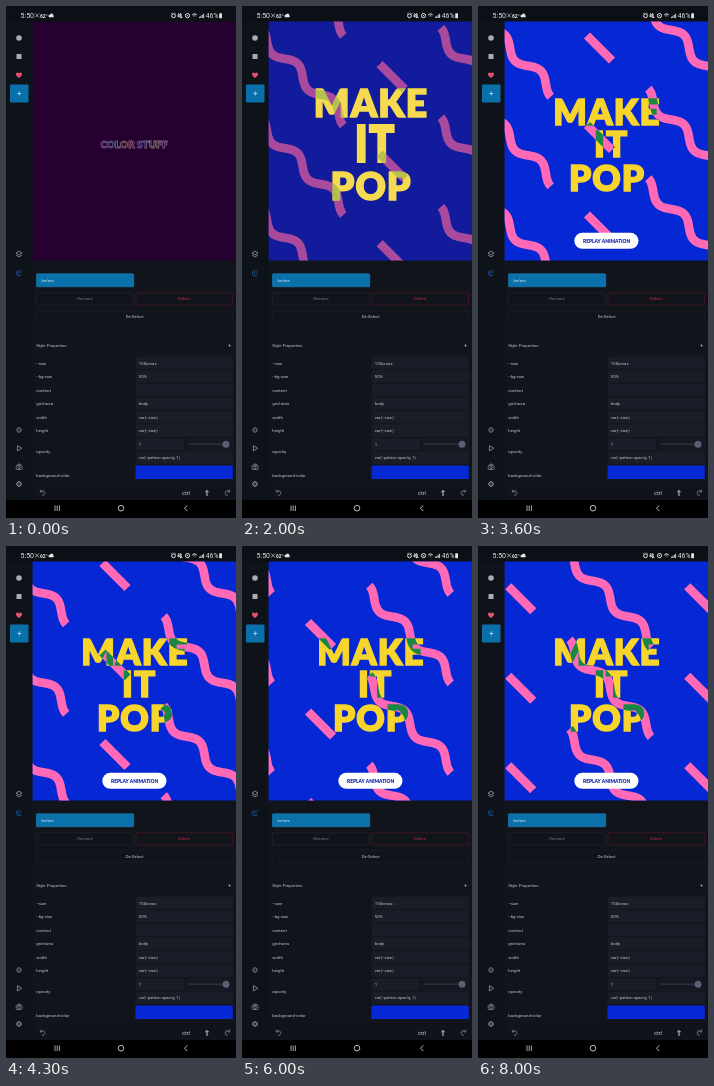
An HTML page with a canvas for the animation above (8100 ms loop, 230 by 512 pixels).

```html
<!DOCTYPE html>
<html lang="en">
<head>
<meta charset="utf-8">
<title>Make it pop</title>
<style>
  html, body { margin: 0; width: 100%; height: 100%; overflow: hidden; background: #000; }
  canvas { display: block; width: 230px; height: 512px; }
</style>
</head>
<body>
<canvas id="stage"></canvas>
<script>
const W = 230, H = 512, LOOP = 8100, STEP = 100;
const VIEW = { x: 26.6, y: 15.5, w: 203.4, h: 239 };
const TILE = 179, HALF = TILE / 2;
const UI = 'Roboto, sans-serif', DISPLAY = 'Lato, sans-serif';
const dpr = Math.max(1, window.devicePixelRatio || 1);

function makeLayer(canvas) {
  canvas.width = W * dpr;
  canvas.height = H * dpr;
  const c = canvas.getContext('2d');
  c.scale(dpr, dpr);
  return c;
}
const ctx = makeLayer(document.getElementById('stage'));
const words = makeLayer(document.createElement('canvas'));
const panel = makeLayer(document.createElement('canvas'));

// Smooth interpolation through [time, value] pairs.
function track(t, ...keys) {
  if (t <= keys[0][0]) return keys[0][1];
  for (let i = 1; i < keys.length; i++) {
    const [a, from] = keys[i - 1], [b, to] = keys[i];
    if (t <= b) {
      const u = (t - a) / (b - a);
      return from + (to - from) * u * u * (3 - 2 * u);
    }
  }
  return keys[keys.length - 1][1];
}

const mix = (a, b, u) => `rgb(${a.map((v, i) => Math.round(v + (b[i] - v) * u))})`;

function box(c, x, y, w, h, fill, stroke, r = 0) {
  c.beginPath();
  c.roundRect(x, y, w, h, r);
  if (fill) { c.fillStyle = fill; c.fill(); }
  if (stroke) { c.strokeStyle = stroke; c.lineWidth = 0.6; c.stroke(); }
}

function label(c, str, x, y, size, color, align = 'left', weight = 400, family = UI) {
  c.font = `${weight} ${size}px ${family}`;
  c.textAlign = align;
  c.textBaseline = 'alphabetic';
  c.fillStyle = color;
  c.fillText(str, x, y);
}

function line(c, points, color, width = 0.8, close = false) {
  c.beginPath();
  points.forEach(([x, y], i) => i ? c.lineTo(x, y) : c.moveTo(x, y));
  if (close) c.closePath();
  c.strokeStyle = color;
  c.lineWidth = width;
  c.stroke();
}

function disc(c, x, y, r, fill, stroke, width = 0.8) {
  c.beginPath();
  c.arc(x, y, r, 0, Math.PI * 2);
  if (fill) { c.fillStyle = fill; c.fill(); }
  if (stroke) { c.strokeStyle = stroke; c.lineWidth = width; c.stroke(); }
}

function arc(c, x, y, r, from, to, color, width = 0.8) {
  c.beginPath();
  c.arc(x, y, r, from, to);
  c.strokeStyle = color;
  c.lineWidth = width;
  c.stroke();
}

function gear(c, x, y, color) {
  for (let i = 0; i < 8; i++) {
    const a = i * Math.PI / 4, dx = Math.cos(a), dy = Math.sin(a);
    line(c, [[x + dx * 2, y + dy * 2], [x + dx * 3, y + dy * 3]], color, 0.9);
  }
  disc(c, x, y, 2, null, color, 0.7);
  disc(c, x, y, 0.6, color);
}

function statusBar(c) {
  const white = '#e4e4e4';
  label(c, '5:50', 14.5, 12, 7, white);
  line(c, [[29, 7.5], [33, 11.5]], white, 0.7);
  line(c, [[33, 7.5], [29, 11.5]], white, 0.7);
  label(c, '62°', 34, 11.6, 5, white, 'left', 700);
  disc(c, 43.7, 10, 1.2, white);
  disc(c, 45.6, 9.3, 1.7, white);
  box(c, 43, 9.8, 4.8, 1.5, white, null, 0.7);
  disc(c, 167.5, 9.8, 1.9, null, white, 1);
  line(c, [[165.3, 7.8], [166.4, 7]], white);
  line(c, [[168.6, 7], [169.7, 7.8]], white);
  line(c, [[172, 9], [173.4, 9], [175, 7.5], [175, 12], [173.4, 10.7], [172, 10.7]], white, 1, true);
  line(c, [[172, 7], [176.5, 12]], white);
  disc(c, 181.5, 9.6, 2.1, null, white, 1);
  disc(c, 181.5, 9.6, 0.7, white);
  arc(c, 188.5, 10.8, 2.9, Math.PI * 1.2, Math.PI * 1.8, white, 1);
  arc(c, 188.5, 11, 1.3, Math.PI * 1.2, Math.PI * 1.8, white);
  for (let i = 0; i < 4; i++) box(c, 193 + i * 1.4, 10.7 - i, 0.9, 1.2 + i, white);
  label(c, '46%', 199.8, 12, 6.8, white);
  box(c, 213.2, 7.2, 2.8, 5, white, null, 0.6);
}

function sidebar(c) {
  const grey = '#a9adb4';
  disc(c, 13, 32, 2.8, grey);
  box(c, 10.5, 48, 5, 5, grey);
  c.fillStyle = '#e2506c';
  c.beginPath();
  c.moveTo(13, 72);
  c.bezierCurveTo(7.5, 68.5, 10.8, 64.6, 13, 67.3);
  c.bezierCurveTo(15.2, 64.6, 18.5, 68.5, 13, 72);
  c.fill();
  box(c, 4, 78.5, 18.5, 18, '#0a70aa', null, 1);
  line(c, [[13.3, 85.5], [13.3, 89.5]], '#d7e8f2', 0.7);
  line(c, [[11.3, 87.5], [15.3, 87.5]], '#d7e8f2', 0.7);
  line(c, [[13, 245], [16, 247], [13, 249], [10, 247]], grey, 0.7, true);
  line(c, [[10, 249], [13, 251], [16, 249]], grey, 0.7);
  const blue = '#245fa8';
  arc(c, 13, 267, 2.7, 0.5, 4.6, blue, 0.9);
  arc(c, 13.6, 267, 1.2, 2, 6, blue, 0.8);
  line(c, [[14.5, 265], [16, 264]], blue);
  gear(c, 13, 424, '#858991');
  line(c, [[11.4, 439.7], [15.7, 442.3], [11.4, 444.9]], grey, 0.7, true);
  box(c, 10.2, 459.3, 5.8, 4.2, null, grey, 0.7);
  line(c, [[11.8, 459], [12.3, 458], [14, 458], [14.5, 459]], grey, 0.6);
  disc(c, 13.1, 461.4, 1.2, null, grey, 0.6);
  gear(c, 13, 478, grey);
}

function properties(c) {
  const text = '#c6c9ce', field = '#191d28', edge = '#1c202b', size = 4.3;
  box(c, 30.5, 267.8, 97.2, 13, '#0b71ab', '#1d83ba', 0.8);
  label(c, 'before', 35.5, 275.7, size, '#d5e6f0');
  box(c, 30.5, 286.8, 97, 12.2, null, '#242830', 0.6);
  label(c, 'Rename', 79, 294.3, size, '#727780', 'center');
  box(c, 130, 286.8, 96.5, 12.2, null, '#591825', 0.6);
  label(c, 'Delete', 178, 294.3, size, '#c32940', 'center');
  box(c, 30.5, 304.8, 196, 12, null, '#1d2028', 0.6);
  label(c, 'De-Select', 128.7, 312, size, text, 'center');
  line(c, [[30, 327], [227, 327]], '#161921', 0.6);

  label(c, 'Style Properties', 30.3, 341, size, text);
  label(c, '+', 223.5, 341.2, 5.5, text, 'center');
  const rows = [
    ['--size', '150cmax'], ['--bg-size', '50%'], ['content', ''],
    ['grid-area', 'body'], ['width', 'var(--size)'], ['height', 'var(--size)']
  ];
  rows.forEach(([name, value], i) => {
    const y = 357 + i * 13.55;
    label(c, name, 30.3, y + 1.5, size, text);
    box(c, 130, y - 6, 96.5, 11.8, field, edge, 0.5);
    label(c, value, 132.8, y + 1.5, size, text);
  });
  label(c, 'opacity', 30.3, 446.5, size, text);
  box(c, 130, 432.4, 47.5, 11.8, field, edge, 0.5);
  label(c, '1', 132.8, 439.9, size, text);
  box(c, 180, 432.4, 46.5, 11.8, '#151820', edge, 0.5);
  box(c, 182, 437.2, 40, 1.8, '#292d37', null, 0.9);
  disc(c, 220, 438.2, 3.5, '#596075');
  box(c, 130, 446, 96.5, 11.8, field, edge, 0.5);
  label(c, 'var(--pattern-opacity, 1)', 132.8, 453.4, 4, text);
  label(c, 'background-color', 30.3, 471.4, size, text);
  box(c, 129.5, 459.6, 97.3, 13.3, '#0729d5');
}

function toolbars(c) {
  const grey = '#9296a0', white = '#d0d0d0';
  box(c, 27, 476, 203, 18, '#10131a');
  arc(c, 36.5, 487, 2.3, -2.5, 1.8, grey, 0.7);
  line(c, [[34.2, 483.7], [34.5, 486], [36.7, 485.8]], grey, 0.7);
  label(c, 'ctrl', 180, 488.6, 5.5, white, 'center');
  line(c, [[201, 490], [201, 484.6]], white, 1);
  line(c, [[199.2, 486.2], [201, 484.4], [202.8, 486.2]], white, 0.9);
  arc(c, 221.5, 487, 2.3, 1.4, 5.7, grey, 0.7);
  line(c, [[223.8, 483.7], [223.5, 486], [221.3, 485.8]], grey, 0.7);

  box(c, 0, 494, W, 18, '#000');
  for (const x of [49, 51.2, 53.4]) line(c, [[x, 499.5], [x, 505]], white, 0.8);
  disc(c, 115, 502.2, 2.8, null, white, 0.9);
  line(c, [[181.3, 499.4], [178.5, 502.2], [181.3, 505]], white, 0.9);
}

function paintPanel() {
  box(panel, 0, 0, W, 16, '#0c1016');
  box(panel, 0, 16, W, 478, '#11141b');
  box(panel, 0, 16, 27, 478, '#0e1219');
  statusBar(panel);
  sidebar(panel);
  properties(panel);
  toolbars(panel);
}

// One bar and one wave of two and a half periods, each centred on its half tile.
const motif = new Path2D();
motif.moveTo(-12.5, -12.5);
motif.lineTo(12.5, 12.5);
for (let s = 0; s <= HALF; s += 0.5) {
  const sway = 4 * Math.cos(s / HALF * Math.PI * 5);
  const x = HALF / 2 + s + sway, y = s - HALF / 2 - sway;
  s ? motif.lineTo(x, y) : motif.moveTo(x, y);
}

function pattern(c, t, color, alpha) {
  const shift = TILE * (t - 3600) / 10000;
  c.save();
  c.globalAlpha = alpha;
  c.strokeStyle = color;
  c.lineWidth = 8.7;
  c.lineJoin = 'round';
  for (let x = -TILE; x <= TILE; x += TILE) {
    for (let y = -HALF; y <= HALF * 4; y += HALF) {
      c.save();
      c.translate(121.5 - shift + x, 42 - shift + y);
      c.stroke(motif);
      c.restore();
    }
  }
  c.restore();
}

function word(str, x, y, sx, sy, color) {
  words.save();
  words.translate(x, y);
  words.scale(sx, sy);
  words.letterSpacing = '1px';
  label(words, str, 0.5, 12.5, 35, color, 'center', 900, DISPLAY);
  words.strokeStyle = color;
  words.lineWidth = 1.4;
  words.strokeText(str, 0.5, 12.5);
  words.restore();
}

function headline(t, lit) {
  const grow = track(t, [1050, 0], [1800, 1.066], [2050, 1.066], [2500, 1]);
  const push = track(t, [1500, 0], [1950, 1], [2050, 1], [2500, 0]);
  words.clearRect(0, 0, W, H);
  if (grow <= 0) return;
  const color = mix([242, 232, 150], [248, 213, 44], lit);
  words.save();
  word('MAKE', 128.4, 138.5 - 32.5 * grow - 6 * push, grow, grow, color);
  word('IT', 132.6, 138.5, grow * (1 + 0.12 * push), grow * (1 + 0.35 * push), color);
  word('POP', 128.6, 138.5 + 33.5 * grow + 6 * push, grow, grow, color);
  words.globalCompositeOperation = 'source-atop';
  pattern(words, t, '#198644', lit ** 3);
  words.restore();
  ctx.drawImage(words.canvas, 0, 0, W, H);
}

function opening(t) {
  const alpha = track(t, [800, 1], [1150, 0]);
  if (!alpha) return;
  const tint = ctx.createLinearGradient(95, 0, 161, 0);
  ['#8d5a9d', '#53769a', '#9a6a5d', '#5d5ca8', '#8e8a62', '#77508e']
    .forEach((color, i) => tint.addColorStop(i / 5, color));
  ctx.save();
  ctx.globalAlpha = alpha;
  ctx.font = `900 10px ${DISPLAY}`;
  ctx.textAlign = 'center';
  ctx.strokeStyle = tint;
  ctx.lineWidth = 0.8;
  ctx.strokeText('COLOR STUFF', 128, 142.3);
  ctx.restore();
}

function replay(t) {
  const alpha = track(t, [2700, 0], [3200, 1]);
  if (!alpha) return;
  ctx.save();
  ctx.globalAlpha = alpha;
  box(ctx, 96.3, 226.8, 64.2, 16, '#fff', null, 8);
  label(ctx, 'REPLAY ANIMATION', 128.6, 236.5, 4.8, '#1324a8', 'center', 900, DISPLAY);
  ctx.restore();
}

function draw(t) {
  ctx.drawImage(panel.canvas, 0, 0, W, H);
  ctx.save();
  ctx.beginPath();
  ctx.rect(VIEW.x, VIEW.y, VIEW.w, VIEW.h);
  ctx.clip();
  const lit = track(t, [900, 0], [2700, 1]);
  ctx.fillStyle = mix([38, 0, 46], [6, 40, 212], lit);
  ctx.fillRect(0, 0, W, H);
  if (lit) pattern(ctx, t, mix([235, 85, 110], [255, 105, 182], lit), lit);
  opening(t);
  headline(t, lit);
  replay(t);
  ctx.restore();
}

paintPanel();
const start = performance.now();
function tick() {
  const t = (performance.now() - start) % LOOP;
  draw(Math.floor(t / STEP) * STEP);
  requestAnimationFrame(tick);
}
tick();
</script>
</body>
</html>
```
